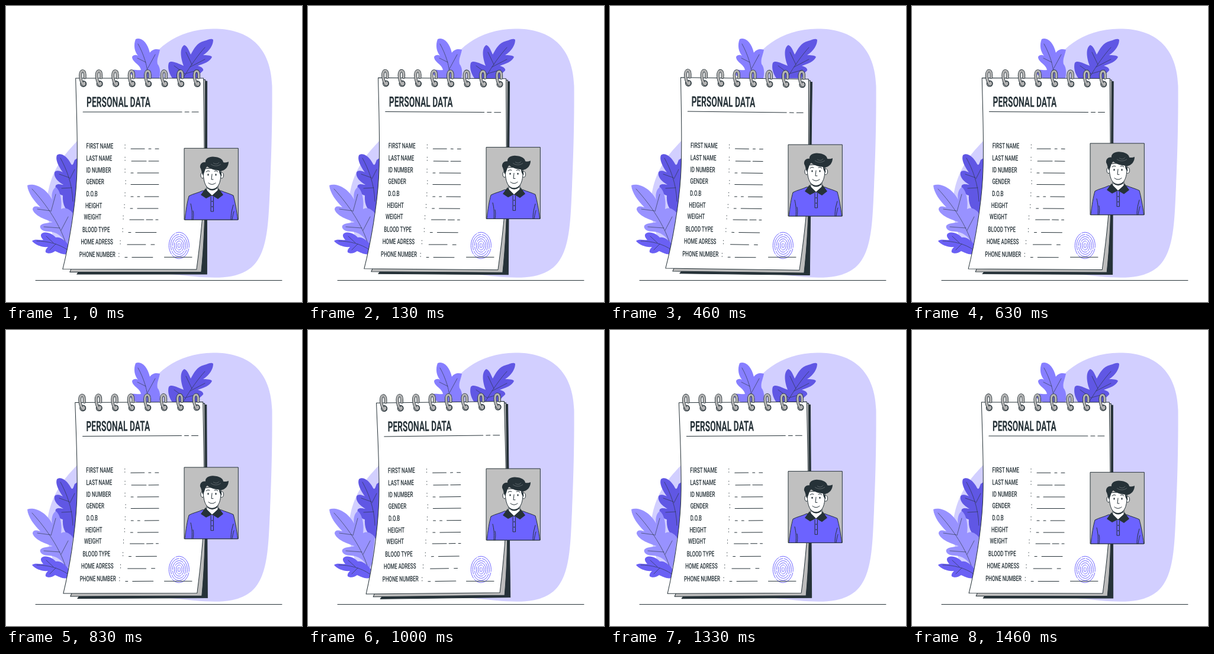
Recreate the animation shown at these times as an HTML page. Size 500 by 500 pixels, loop 1500 ms.

```html
<!DOCTYPE html>
<html lang="en">
<head>
<meta charset="utf-8">
<title>Personal data</title>
<style>
  html, body { margin: 0; width: 100%; height: 100%; overflow: hidden; background: #fff; }
  svg { display: block; width: 100%; height: 100%; }
  text { font-family: Roboto, "Liberation Sans", sans-serif; fill: #263238; }
  .line { fill: none; stroke: #263238; stroke-width: 1; stroke-linecap: round; stroke-linejoin: round; }
  .vein { fill: none; stroke: #263238; stroke-width: .6; stroke-linecap: round; }
  .sheet { stroke: #263238; stroke-width: 1; stroke-linejoin: round; }
  .dark { fill: #263238; }
</style>
</head>
<body>
<svg viewBox="0 0 500 500">
  <path fill="#d2cfff" d="M350 38.500C400 38 447 60 449.500 135C450 200 448 260 446 305C443 370 443 428 405 448C375 465 330 458 278 453C200 447 110 440 85 400C60 350 62 290 112 237C140 205 195 165 227 118C246 74 288 39 350 38.500Z"/>

  <g id="leaves">
    <path fill="#877fff" d="M222 122C214 120 208 113 210 109C213 106 221 109 228 108C226 98 213 95 213 86C215 82 220 82 223 84C217 77 215 66 219 56C229 52 239 62 243 79C247 73 254 72 260 74C258 84 254 90 256 98C261 104 261 114 259 122Z"/>
    <path class="vein" d="M239 122C241 105 232 80 223 64M236 95L222 88M239 106L252 82"/>
    <path fill="#6057e4" d="M281 122C274 112 273 102 275 96C279 91 290 97 300 101C296 90 292 72 301 66C306 67 309 75 312 82C318 72 322 62 335 59C342 57 347 54 350 57C350 66 344 76 333 83C338 83 346 83 348 86C345 94 333 98 324 101C331 103 334 106 333 109C328 114 325 115 324 122Z"/>
    <path class="vein" d="M299 122C312 100 325 82 336 70M314 99L304 78M311 103L336 90M303 115L284 101M304 114L325 108"/>
    <path fill="#6057e4" d="M114 352C101 347 95 337 96 320C87 318 82 308 84 303C88 299 93 302 97 302C88 297 80 289 82 281C84 277 91 278 96 281C88 270 83 259 86 252C92 247 103 253 110 267C113 271 114 265 116 260L124 255L125 340Z"/>
    <path class="vein" d="M92 257C102 275 112 300 113 330M107 290L90 284M111 307L94 308M108 292L116 276"/>
    <path fill="#9892ff" d="M103 404C95 388 86 382 72 381C62 381 56 376 58 371C62 366 71 367 79 365C67 361 49 355 45 344C45 337 52 338 58 340C48 330 37 316 36 303C46 299 66 305 78 327C76 318 79 309 84 306C92 311 95 330 93 343C98 340 106 341 113 350L108 395Z"/>
    <path class="vein" d="M44 309C68 335 92 370 102 404M75 346L53 343M76 347L84 318M91 375L64 373M93 379L105 356"/>
    <path fill="#6a60f4" d="M104 419C96 421 88 416 83 414C78 418 71 419 67 416C66 412 69 409 71 407C61 408 50 404 44 397C49 393 57 396 63 395C58 390 58 386 61 384C68 380 79 385 84 391C91 389 100 396 106 404Z"/>
    <path class="vein" d="M52 397C70 397 90 402 104 412M80 400L68 389M84 402L74 412"/>
  </g>

  <path class="line" d="M50 463.500H466"/>

  <g id="pad">
    <path class="sheet dark" d="M130 127H339.500V453H120L130 440Z"/>
    <path class="sheet" fill="#bdbdbd" d="M125 124.500H336.500V300C336.500 360 334 410 330 449.500H108L116 430Z"/>
    <path class="sheet" fill="#fff" d="M117.500 122H333.500C334 180 335.500 240 335 300C334 350 328 400 322 445L96 444.500C107 400 117 340 119.500 290C122 240 119 180 117.500 122Z"/>
    <path class="line" d="M130 179H297M302 179H309M314 179H325"/>
    <text transform="translate(136 170.500) scale(.575 1)" font-size="24" font-weight="700">PERSONAL DATA</text>
    <g id="rows"></g>
    <g id="rings"></g>
  </g>

  <g id="print" fill="none" stroke="#6c63ff"></g>
  <path class="line" d="M267.500 424.300H314"/>

  <g id="photo">
    <rect class="sheet" x="301" y="240.300" width="91.300" height="120.700" fill="#c0c0c0"/>
    <path class="sheet" fill="#6c63ff" d="M302 361C304 345 306 331 309 321C316 317 324 316 332 312H363C370 315 378 317 384 320C387 331 390 347 391.500 361Z"/>
    <path class="line" d="M314 361C315 350 314 342 312 334M316 361C317 354 317 350 316 346M380 361C380 350 382 343 384 336M382 361C383 354 384 350 385 347"/>
    <path class="sheet" fill="#fff" d="M339 300V312L348 321L358 312V300Z"/>
    <path class="dark" d="M340 303Q348 313 357 303V308Q348 315 340 308Z"/>
    <path class="dark" d="M337 308L329 319L338 325L348 320L339 311ZM359 308L367 319L358 326L348 320L358 311Z"/>
    <path class="line" d="M346 322V347H350.500V322"/>
    <circle class="dark" cx="348.300" cy="330" r="1"/>
    <circle class="dark" cx="348.300" cy="339" r="1"/>
    <ellipse class="sheet" fill="#fff" cx="332" cy="286" rx="3" ry="5"/>
    <ellipse class="sheet" fill="#fff" cx="364.500" cy="286" rx="3" ry="5"/>
    <path class="sheet" fill="#fff" d="M333 275C333 292 335 309 348 309.500C361 309 364 293 363 273Z"/>
    <path class="dark" d="M333 286C330 283 331 278 328 273C327 266 333 263 337 264C336 257 345 253 354 255C363 256 367 261 367 264C370 265 374 264 376 263C376 271 371 278 362 279C363 281 365 284 364 288C361 285 360 281 360 278C350 277 343 274 340 271C336 274 336 280 333 286Z"/>
    <path fill="none" stroke="#90979b" stroke-width=".5" d="M346 267C351 271 358 271 363 267M350 265C354 268 358 267 360 264"/>
    <path class="line" d="M338 280Q341 277 344 279M352 279Q355 277 358 280M348 284L347 293H350M342 299Q348 304 354 299"/>
    <ellipse class="dark" cx="341.500" cy="285" rx="1.200" ry="1.700"/>
    <ellipse class="dark" cx="354.500" cy="285" rx="1.200" ry="1.700"/>
  </g>
</svg>
<script>
const $ = id => document.getElementById(id);

// label, x, baseline, colon x, dashes as "from-to"
const rows = [
  ['FIRST NAME', 135.5, 240.7, 201, '211-234 241-245 252-258'],
  ['LAST NAME', 135.5, 261.5, 201, '212-237 241-258'],
  ['ID NUMBER', 135.5, 281.5, 201, '211-215 222-258'],
  ['GENDER', 135.5, 301, 202, '211-258'],
  ['D.O.B', 135.5, 321.5, 201, '211-215 222-226 234-258'],
  ['HEIGHT', 134, 341.5, 200, '210-214 222-257'],
  ['WEIGHT', 131.5, 360.5, 198, '209-233 237-248 253-257'],
  ['BLOOD TYPE', 129, 382, 197, '207-211 219-254'],
  ['HOME ADRESS', 126.5, 402.5, 193, '205-236 245-251'],
  ['PHONE NUMBER', 124, 424, 191, '201-205 213-248'],
];
const label = (text, x, y) =>
  `<text transform="translate(${x} ${y}) scale(.635 1)" font-size="12.6" font-weight="500">${text}</text>`;
const dashes = (spans, y) =>
  spans.split(' ').map(s => { const [a, b] = s.split('-'); return `M${a} ${y}H${b}`; }).join('');
$('rows').innerHTML = rows.map(([text, x, y, colon, spans]) =>
  label(text, x, y) + label(':', colon - 1, y) +
  `<path class="line" d="${dashes(spans, y + .5)}"/>`).join('');

const ring = 'M4 121V116C4 107.500 -3.500 107.500 -3.500 117C-3.500 125 -1 130 1.500 133C3.500 134 4.500 131 3 129.500';
$('rings').innerHTML = Array.from({ length: 8 }, (_, i) =>
  `<g transform="translate(${129 + i * 27.5} 0)" fill="none" stroke-linecap="round">
    <circle class="sheet" cx="1.500" cy="131.500" r="5" fill="#b3b3b3"/>
    <path d="${ring}" stroke="#263238" stroke-width="5"/>
    <path d="${ring}" stroke="#b3b3b3" stroke-width="3.400"/></g>`).join('');

$('print').innerHTML = Array.from({ length: 6 }, (_, i) =>
  `<ellipse cx="292.300" cy="404.500" rx="${2 + i * 3}" ry="${4 + i * 3.65}"
    stroke-dasharray="${14 + i * 5} 1.500" stroke-dashoffset="${i * 7}"/>`).join('');

const LOOP = 1500, STEPS = 36;

function draw(now) {
  const step = Math.floor((now % LOOP + 5) * STEPS / LOOP);
  const p = (step + .5) / STEPS % 1;
  const lift = 10 * (1 - Math.abs(1 - 2 * p));
  const tilt = p < .25 ? 4 * p : p < .75 ? 2 - 4 * p : 4 * p - 4;
  $('photo').setAttribute('transform', `translate(0 ${.3 - lift})`);
  $('pad').setAttribute('transform', `rotate(${tilt} 218 280)`);
}

let start;
function tick(now) {
  start ??= now;
  draw(now - start);
  requestAnimationFrame(tick);
}
draw(0);
requestAnimationFrame(tick);
</script>
</body>
</html>
```
